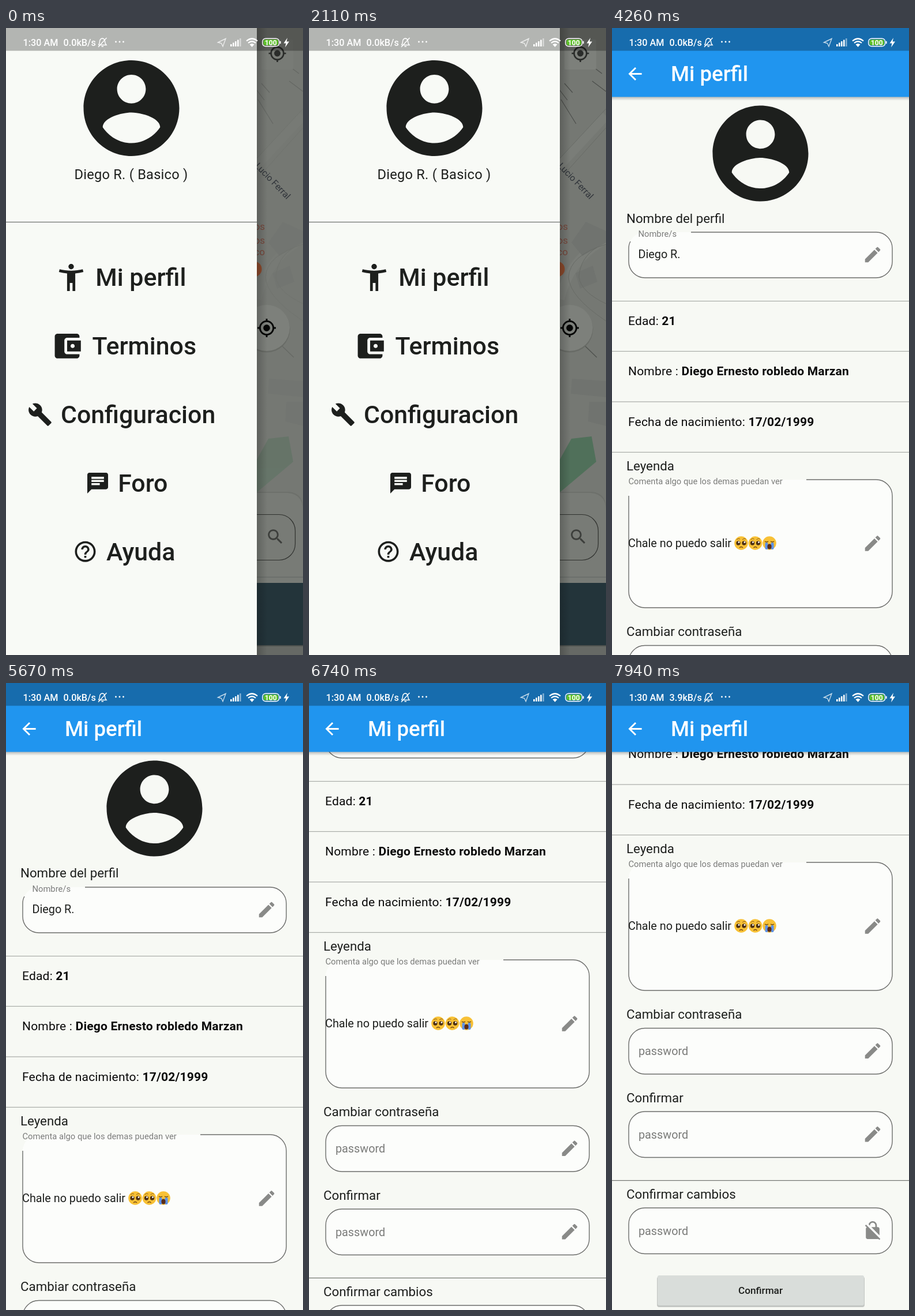
An HTML page for the animation above (7.99 s loop, 515 by 1087 pixels).

```html
<!DOCTYPE html>
<html lang="es">
<head>
<meta charset="utf-8">
<style>
html, body { margin: 0; width: 100%; height: 100%; overflow: hidden; background: #f8faf6 }
svg { display: block; width: 515px; height: 1087px; font-family: Roboto, sans-serif; fill: #1d1f1d }
.menu { font-size: 42.8px; font-weight: 500 }
.head { font-size: 22.3px }
.info { font-size: 21px; letter-spacing: .2px; fill: #0a0a0a }
.info tspan { font-weight: 700 }
.field { font-size: 19.8px }
.label { font-size: 14.75px }
.hint { fill: #7a7b79 }
.box { fill: none; stroke: #6c6d6b; stroke-width: 1.4 }
.bar { font-size: 16.2px; font-weight: 500; fill: #fff }
</style>
</head>
<body>
<svg id="stage" viewBox="0 0 515 1087"></svg>
<script>
const LOOP = 7990;
const PATHS = {
  avatar: 'M12 2C6.48 2 2 6.48 2 12s4.48 10 10 10 10-4.48 10-10S17.52 2 12 2zm0 3c1.66 0 3 1.34 3 3s-1.34 3-3 3-3-1.34-3-3 1.34-3 3-3zm0 14.3c-2.5 0-4.71-1.38-6-3.32.03-1.99 4-3.08 6-3.08 1.99 0 5.97 1.09 6 3.08-1.29 1.94-3.5 3.32-6 3.32z',
  person: 'M20.5 6c-2.61.7-5.67 1-8.5 1s-5.89-.3-8.5-1L3 8c1.86.5 4 .83 6 1v13h2v-6h2v6h2V9c2-.17 4.14-.5 6-1l-.5-2zM12 6c1.1 0 2-.9 2-2s-.9-2-2-2-2 .9-2 2 .9 2 2 2z',
  wallet: 'M21 18v1c0 1.1-.9 2-2 2H5c-1.11 0-2-.9-2-2V5c0-1.1.89-2 2-2h14c1.1 0 2 .9 2 2v1h-9c-1.11 0-2 .9-2 2v8c0 1.1.89 2 2 2h9zm-9-2h10V8H12v8zm4-2.5c-.83 0-1.5-.67-1.5-1.5s.67-1.5 1.5-1.5 1.5.67 1.5 1.5-.67 1.5-1.5 1.5z',
  wrench: 'M22.7 19l-9.1-9.1c.9-2.3.4-5-1.5-6.9-2-2-5-2.4-7.4-1.3L9 6 6 9 1.6 4.7C.4 7.1.9 10.1 2.9 12.1c1.9 1.9 4.6 2.4 6.9 1.5l9.1 9.1c.4.4 1 .4 1.4 0l2.3-2.3c.5-.4.5-1.1.1-1.4z',
  chat: 'M20 2H4c-1.1 0-1.99.9-1.99 2L2 22l4-4h14c1.1 0 2-.9 2-2V4c0-1.1-.9-2-2-2zM6 9h12v2H6V9zm8 5H6v-2h8v2zm4-6H6V6h12v2z',
  help: 'M11 18h2v-2h-2v2zm1-16C6.48 2 2 6.48 2 12s4.48 10 10 10 10-4.48 10-10S17.52 2 12 2zm0 18c-4.41 0-8-3.59-8-8s3.59-8 8-8 8 3.59 8 8-3.59 8-8 8zm0-14c-2.21 0-4 1.79-4 4h2c0-1.1.9-2 2-2s2 .9 2 2c0 2-3 1.75-3 5h2c0-2.25 3-2.5 3-5 0-2.21-1.79-4-4-4z',
  gps: 'M12 8c-2.21 0-4 1.79-4 4s1.79 4 4 4 4-1.79 4-4-1.79-4-4-4zm8.94 3c-.46-4.17-3.77-7.48-7.94-7.94V1h-2v2.06C6.83 3.52 3.52 6.83 3.06 11H1v2h2.06c.46 4.17 3.77 7.48 7.94 7.94V23h2v-2.06c4.17-.46 7.48-3.77 7.94-7.94H23v-2h-2.06zM12 19c-3.87 0-7-3.13-7-7s3.13-7 7-7 7 3.13 7 7-3.13 7-7 7z',
  search: 'M15.5 14h-.79l-.28-.27C15.41 12.59 16 11.11 16 9.5 16 5.91 13.09 3 9.5 3S3 5.91 3 9.5 5.91 16 9.5 16c1.61 0 3.09-.59 4.23-1.57l.27.28v.79l5 4.99L20.49 19l-4.99-5zm-6 0C7.01 14 5 11.99 5 9.5S7.01 5 9.5 5 14 7.01 14 9.5 11.99 14 9.5 14z',
  back: 'M20 11H7.83l5.59-5.59L12 4l-8 8 8 8 1.41-1.41L7.83 13H20v-2z',
  pen: 'M3 17.25V21h3.75L17.81 9.94l-3.75-3.75L3 17.25zM20.71 7.04c.39-.39.39-1.02 0-1.41l-2.34-2.34c-.39-.39-1.02-.39-1.41 0l-1.83 1.83 3.75 3.75 1.83-1.83z',
  unlock: 'M21 21.78L4.22 5 3 6.22l2.04 2.04C4.42 8.6 4 9.25 4 10v10c0 1.1.9 2 2 2h12c.23 0 .45-.05.66-.12L19.78 23 21 21.78zM8.9 6c0-1.71 1.39-3.1 3.1-3.1s3.1 1.39 3.1 3.1v2h-4.66L20 17.56V10c0-1.1-.9-2-2-2h-1V6c0-2.76-2.24-5-5-5-2.32 0-4.26 1.59-4.82 3.74L8.9 6.46V6z'
};

// Icons are centred on x, y.
const icon = (name, x, y, s, fill = '#1d1f1d') =>
  `<path d="${PATHS[name]}" fill="${fill}" transform="translate(${x} ${y}) scale(${s}) translate(-12 -12)"/>`;
const text = (cls, x, y, str, extra = '') => `<text class="${cls}" x="${x}" y="${y}" ${extra}>${str}</text>`;
const rect = (x, y, w, h, fill, r = 0) => `<rect x="${x}" y="${y}" width="${w}" height="${h}" rx="${r}" fill="${fill}"/>`;
const circle = (x, y, r, fill) => `<circle cx="${x}" cy="${y}" r="${r}" fill="${fill}"/>`;
const line = (d, stroke, w = 1) => `<path d="${d}" fill="none" stroke="${stroke}" stroke-width="${w}"/>`;
const shape = (d, fill) => `<path d="${d}" fill="${fill}"/>`;
const rule = (y, w = 515, color = '#a9aba8') => rect(0, y - .6, w, 1.2, color);

// Outlined field; gap is where the top edge resumes after a floating label.
function field(y, h, mark = 'pen', gap = 0, left = '') {
  const b = y + h;
  const edge = gap
    ? `<path class="box" d="M${gap} ${y}H458a28 28 0 0 1 28 28V${b - 28}a28 28 0 0 1-28 28H57a28 28 0 0 1-28-28V${y + 28}${left}"/>`
    : `<rect class="box" x="29" y="${y}" width="457" height="${h}" rx="28"/>`;
  return rect(29, y, 457, h, '#fcfdfb', 28) + edge + icon(mark, 452, y + h / 2 - .5, 1.475, '#898a88');
}
const password = (y, mark) => field(y, 79.5, mark) + text('field hint', 46, y + 46.5, 'password');

function face(x, crying) {
  const eyes = [-5, 5].map(dx => crying
    ? rect(x + dx - 2.5, 892, 5, 12, '#5d92e8', 2) + line(`M${x + dx - 3} 890q3 2 6 0`, '#5a3a12', 1.4)
    : circle(x + dx, 893, 3.7, '#4d3013') + circle(x + dx + 1, 891.5, 1.4, '#fff') +
      line(`M${x + dx - 3} 887q3-3 6-1`, '#8a5a14')).join('');
  const mouth = crying ? `<ellipse cx="${x}" cy="899" rx="3.6" ry="4.5" fill="#5a2d18"/>`
                       : line(`M${x - 3} 901q3-3 6 0`, '#6b4010', 1.3);
  return circle(x, 893, 11.8, '#f8c136') + eyes + mouth;
}

const map = `
  ${rect(435, 0, 80, 1087, '#757873')}
  <g id="map">
    ${line('M435 238L515 152M435 470Q452 400 515 366', '#7a7d78', 16)}
    ${shape('M455 372L480 336 515 352V372L474 395Z M456 608L515 612V640L454 634Z M486 648H515V690L484 682Z M462 425L492 412 500 440 470 452Z', '#70736f')}
    ${line('M443 96L457 112M437 124L463 166M488 64L508 79M491 92L515 110M435 108L448 125', '#4c4e4b', 1.2)}
    ${line('M435 226L515 140M444 252L515 173M515 375Q452 394 450 432Q452 466 515 508M500 380Q470 398 468 432Q472 458 515 478', '#686b66')}
    ${line('M467 540L499 571', '#4e514d', 1.3)}
    ${rect(443, 20, 55, 52, '#7d807b', 2)}
    ${shape('M435 748L455 712 490 708 498 752 435 805Z', '#50705a')}
  </g>
  ${icon('gps', 470.5, 44, 1.36, '#2a2c2a')}
  <text font-size="15.5" fill="#30343a" transform="translate(431 240) rotate(46)">Lucio Ferral</text>
  <g font-size="17" fill="#77473b">${[['os', 350], ['os', 374], ['co', 394]].map(([s, y]) =>
    `<text x="449" y="${y}" text-anchor="end">${s}</text>`).join('')}</g>
  ${circle(430, 418, 13.5, '#8d4a2c')}
  ${circle(452, 522, 40.5, '#686b66')}${circle(452, 520, 40, '#7d807b')}${icon('gps', 452, 520, 1.45, '#050605')}
  ${shape('M435 804H490Q515 806 515 832V962H435Z', '#6d706b')}
  ${shape('M435 806H488Q515 808 515 836V962H435Z', '#787b76')}
  <rect x="380" y="843.5" width="121.5" height="79" rx="28" fill="none" stroke="#30322f" stroke-width="1.2"/>
  ${icon('search', 467, 882, 1.42, '#3c3e3b')}
  ${rule(952, 515, '#666965')}
  ${rect(435, 962, 80, 108, '#23343a')}${rect(435, 1070, 80, 17, '#666965')}${rule(1071, 515, '#3f4442')}
  ${rect(435, 0, 18, 1087, 'url(#side)')}`;

const menu = [
  ['person', 113, 2.36, 155.3, 'Mi perfil'],
  ['wallet', 106, 2.38, 149.4, 'Terminos'],
  ['wrench', 59, 1.8, 95, 'Configuracion'],
  ['chat', 159, 1.8, 194.2, 'Foro'],
  ['help', 137.5, 1.8, 174, 'Ayuda']
].map(([name, ix, s, tx, str], i) =>
  icon(name, ix, 432.5 + i * 118.8, s) + text('menu', tx, 447 + i * 119, str)).join('');

const drawer = `
  ${rect(0, 0, 435, 1087, '#f8faf6')}
  ${icon('avatar', 217.5, 139, 8.3)}
  <text x="217" y="262" font-size="23.6" letter-spacing=".25" text-anchor="middle">Diego R. ( Basico )</text>
  ${rule(336.5, 435, '#696c6c')}
  <g clip-path="url(#row)">
    <rect id="glow" x="0" y="404" width="435" height="57" fill="#000"/>
    <circle id="splash" cy="432" fill="#000" opacity=".12"/>
  </g>
  ${menu}`;

const info = (y, key, value) => text('info', 28, y, `${key} <tspan>${value}</tspan>`);
const page = `
  ${rect(0, 0, 515, 1400, '#f7f9f4')}
  <g id="list">
    ${icon('avatar', 257.5, 217.5, 8.3)}
    ${text('head', 25, 337.5, 'Nombre del perfil')}
    ${field(354, 79, 'pen', 137, 'q0-7 3-12')}
    ${text('label hint', 45.5, 362, 'Nombre/s')}
    ${text('field', 45.5, 399, 'Diego R.')}
    ${[473.5, 560.5, 648, 735.5].map(y => rule(y)).join('')}
    ${info(515, 'Edad:', '21')}
    ${info(602, 'Nombre :', 'Diego Ernesto robledo Marzan')}
    ${info(689.5, 'Fecha de nacimiento:', '17/02/1999')}
    ${text('head', 25, 766.5, 'Leyenda')}
    ${field(783, 222, 'pen', 337)}
    ${text('label hint', 28.5, 791, 'Comenta algo que los demas puedan ver')}
    ${text('field', 28, 899.5, 'Chale no puedo salir')}
    ${face(224)}${face(248.5)}${face(273, true)}
    ${text('head', 25, 1054, 'Cambiar contraseña')}
    ${password(1070.5)}
    ${text('head', 25, 1198.5, 'Confirmar')}
    ${password(1215)}
    ${rule(1334.5, 515, '#70726f')}
    ${text('head', 25, 1366, 'Confirmar cambios')}
    ${password(1382, 'unlock')}
    ${rect(78, 1501, 360, 53, '#c3c6c3', 4)}${rect(79, 1499, 358, 52, '#d9ddda', 3)}
    <text x="257.5" y="1530.5" font-size="17.2" font-weight="500" text-anchor="middle">Confirmar</text>
  </g>
  ${rect(0, 119, 515, 7, 'url(#under)')}
  ${rect(0, 0, 515, 119.5, '#2095ef')}
  ${icon('back', 40, 79.5, 1.45, '#fff')}
  <text x="102" y="92" font-size="36.6" font-weight="500" fill="#fff">Mi perfil</text>`;

const status = `
  ${rect(0, 0, 515, 39.5, 'rgba(0,0,0,.28)')}
  ${text('bar', 29.5, 31, '1:30 AM')}
  ${text('bar', 99.5, 31, '', 'id="speed"')}
  ${line('M160.5 29.5H174Q171.5 27 171.5 23Q171 18.5 167 18Q163 18.5 162.5 23Q162.5 27 160.5 29.5M165.5 32H169M174.5 17L160 33', '#fff', 1.4)}
  ${[190.5, 197, 203.5].map(x => circle(x, 24, 1.4, '#fff')).join('')}
  ${line('M367.5 25L381 18.5 376 32 373.5 26.5Z', 'rgba(255,255,255,.75)', 1.4)}
  ${[0, 1, 2, 3, 4].map(i => rect(389 + i * 4, 28 - i * 2.5, 2.6, 4 + i * 2.5, i < 4 ? '#fff' : 'rgba(255,255,255,.45)')).join('')}
  ${line('M417 22.5Q426.5 14.5 436 22.5M420 26Q426.5 20.5 433 26', '#fff', 2.2)}
  ${shape('M422.5 28.5Q426.5 25.5 430.5 28.5L426.5 33Z', '#fff')}
  <rect x="444.7" y="18.2" width="29" height="13.6" rx="5.5" fill="none" stroke="#fff" stroke-width="1.4"/>
  ${rect(446.5, 20, 25.5, 10, '#5fc02c', 3.5)}${rect(474.8, 22.5, 1.8, 5, '#fff', 1)}
  <text x="459.2" y="29.5" font-size="12" font-weight="700" fill="#fff" text-anchor="middle">100</text>
  ${shape('M488 17L481.5 26.5H485.5L484 33.5 491 23.5H486.5Z', '#fff')}`;

const fade = (id, x2, y2, a) => `<linearGradient id="${id}" x1="0" y1="0" x2="${x2}" y2="${y2}">
  <stop offset="0" stop-opacity="${a}"/><stop offset="1" stop-opacity="0"/></linearGradient>`;

const $ = id => document.getElementById(id);
$('stage').innerHTML = `
  <defs>${fade('side', 1, 0, .2)}${fade('under', 0, 1, .25)}
    <clipPath id="row"><rect y="404" width="435" height="57" rx="3"/></clipPath></defs>
  ${map}${drawer}<g id="page">${page}</g>${status}`;

const span = (t, a, b) => Math.min(1, Math.max(0, (t - a) / (b - a)));
const smooth = u => u * u * (3 - 2 * u);
const set = (id, attrs) => { for (const k in attrs) $(id).setAttribute(k, attrs[k]); };

function draw(t) {
  set('map', { opacity: .4 + .6 * span(t, 250, 600) });

  // The splash grows while its centre drifts to the middle of the row.
  const grow = span(t, 2440, 3440);
  set('glow', { opacity: .16 * span(t, 2440, 2640) });
  set('splash', { cx: 60 + 157.5 * grow, r: 376 * grow });

  const enter = span(t, 3570, 3880);
  set('page', { opacity: enter ** 1.8, transform: `translate(0 ${272 * (1 - enter) ** 3})` });

  const scroll = 303 * smooth(span(t, 5670, 6640)) + 169 * smooth(span(t, 7240, 7920));
  set('list', { transform: `translate(0 ${-scroll})` });
  $('speed').textContent = t < 6800 ? '0.0kB/s' : '3.9kB/s';
}

const start = performance.now();
function tick() {
  draw((performance.now() - start) % LOOP);
  requestAnimationFrame(tick);
}
tick();
</script>
</body>
</html>
```
